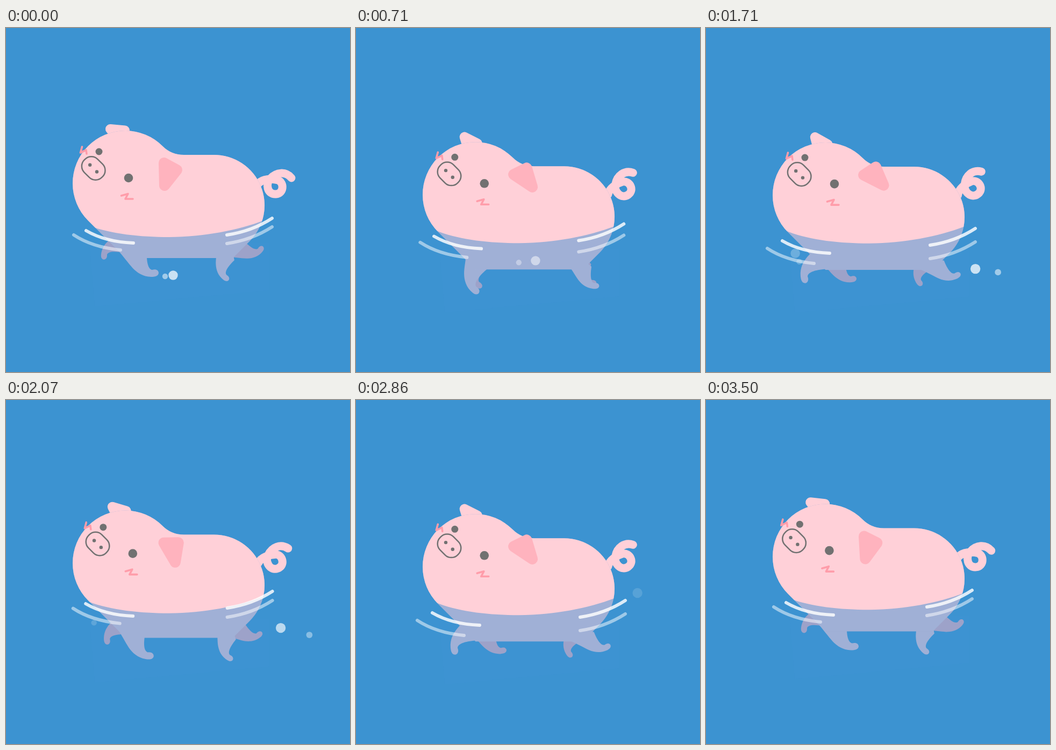
These frames come from a looping animation (640x640 px, 3570 ms). An HTML page with a canvas:

```html
<!DOCTYPE html>
<html lang="en">
<head>
<meta charset="utf-8">
<title>Swimming pig</title>
<style>
html, body { margin: 0; width: 100%; height: 100%; overflow: hidden; background: #3c93d1; }
canvas { display: block; }
</style>
</head>
<body>
<canvas id="stage" width="640" height="640"></canvas>
<script>
const ctx = document.getElementById('stage').getContext('2d');
const LOOP = 3570, FRAMES = 50, FRAME = 500 / 7, STROKES = 3;
const PINK = '#ffd0d8', ROSE = '#ffb3be', BLUSH = '#ff9daa', GREY = '#717171';
const WET = '#a0b0d6', WET_FAR = '#9da2c9';

// Head and rump are circles, joined by a flat back and 45 degree flanks
const body = new Path2D('M152.7 358.3A98 98 0 0 1 291.3 219.700A56 56 0 0 0 331 236H387A94 94 0 0 1 453.5 396.500L422 428H222.400Z');
const air = new Path2D('M0 0H640V300L481 357.500C430 377 370 388 303 389C250 389 195 383 155 368L100 345L0 300Z');
const leg = new Path2D('M26 15C25 38 29 50 36 51C43 49 48 52 48 57C47 63 41 64 34 64C18 63.500 8 56 0 48C-9 38 -18 25 -32 10L-10 -10Z');
const tail = new Path2D('M470 289C478 280 495 280 506 283C518 288 517 308 502 309C486 310 482 290 492 280C503 268 520 266 531 279');
const farEar = new Path2D('M194 188L221 190.500L206 203Z');
const nearEar = new Path2D('M294 251L318 264L295 293Z');
const cheeks = new Path2D('M214.500 312L227 308.500L222 318H236M141.500 221L138.500 232L149 227L150 234');
const glow = new Path2D('M155 400L165 518L490 488V400Z');

// Path, opacity, drift during a stroke
const ripples = [
  ['M149 377Q185 398 237 400', .82, -7, 19],
  ['M126 385Q161 408 213 413', .5, -12, 25],
  ['M411 385Q458 378 495 354', .82, 6, 19],
  ['M411 401Q458 394 495 370', .5, 6, 28]
].map(([d, ...rest]) => [new Path2D(d), ...rest]);

// Hip x, hip y, scale, angle at rest, turn during a kick, colour
const legs = [
  [236, 399, .85, 100, -104, WET_FAR],
  [420, 402, .79, -45, 104, WET_FAR],
  [236, 399, 1, 0, 84, WET],
  [418, 408, .83, 44, -68, WET]
];

// First frame, life in frames, x, y, drift, rise, radius, opacity
const bubbles = [
  [0, 18, 311, 460, 30, 55, 8.7, .72],
  [0, 18, 296, 462, 9, 52, 5.2, .52],
  [16, 12, 180, 453, -16, 55, 8.7, .45],
  [20, 16, 183, 447, -25, 65, 5.2, .25],
  [22, 20, 497, 455, 27, 109, 9.2, .74],
  [20, 17, 523, 465, 56, 60, 5.9, .55]
];

// Bezier ease from 0 to 1 with inner heights a and b
const ease = (u, a, b) => 3 * u * (1 - u) ** 2 * a + 3 * u * u * (1 - u) * b + u ** 3;
const easeOut = u => Math.sin(Math.PI / 2 * Math.min(1, u));

function at(x, y, draw, angle = 0, scale = 1) {
  ctx.save();
  ctx.translate(x, y);
  ctx.rotate(angle * Math.PI / 180);
  ctx.scale(scale, scale);
  draw();
  ctx.restore();
}

const turn = (x, y, angle, draw) =>
  at(x, y, () => { ctx.translate(-x, -y); draw(); }, angle);

function fill(path, color) {
  ctx.fillStyle = color;
  ctx.fill(path);
}

function stroke(path, color, width) {
  ctx.strokeStyle = color;
  ctx.lineWidth = width;
  ctx.stroke(path);
}

function blob(path, color, width) {
  fill(path, color);
  stroke(path, color, width);
}

function dot(x, y, r, color) {
  const p = new Path2D();
  p.arc(x, y, r, 0, Math.PI * 2);
  fill(p, color);
}

const white = alpha => `rgba(255,255,255,${alpha})`;

function drawFace() {
  dot(173, 230, 6.5, GREY);
  dot(228, 279, 8.3, GREY);
  dot(156.2, 254.800, 3.2, GREY);
  dot(169, 267.500, 3.2, GREY);
  at(162.7, 261, () => {
    const snout = new Path2D();
    snout.roundRect(-23, -17.5, 46, 35, 16.5);
    stroke(snout, GREY, 2.5);
  }, 45);
  stroke(cheeks, BLUSH, 3.6);
}

function draw(k) {
  const phase = k * STROKES / FRAMES % 1;
  const u = 1 - Math.abs(1 - 2 * phase);
  const dip = 22.3 * ease(u, .26, 1.07);
  const look = 10.4 * ease(u, .3, 1.3);
  const flap = 1.1 * ease(u, 0, .7);
  const kick = easeOut(2 * phase % 1 / .68);
  const swing = phase < .5 ? kick : 1 - kick;
  const level = dip * .53;

  ctx.fillStyle = '#3c93d1';
  ctx.fillRect(0, 0, 640, 640);
  ctx.lineCap = ctx.lineJoin = 'round';
  at(0, level, () => fill(glow, 'rgba(80,145,218,.07)'));

  at(0, dip, () => {
    for (const [x, y, size, rest, sweep, color] of legs)
      at(x, y, () => fill(leg, color), rest + sweep * swing, size);
    turn(469, 291, -37 * flap, () => stroke(tail, PINK, 15));
    turn(215, 205, 25 * flap, () => blob(farEar, PINK, 18));
    fill(body, WET);
  });

  ctx.save();
  ctx.translate(0, level);
  ctx.clip(air);
  ctx.translate(0, dip - level);
  fill(body, PINK);
  ctx.restore();

  at(0, dip, () => turn(294, 252, -64 * flap, () => blob(nearEar, ROSE, 20)));
  at(look, dip - look, drawFace);

  for (const [path, alpha, dx, dy] of ripples)
    at(dx * swing, dy * swing, () => stroke(path, white(alpha), 6));

  for (const [born, life, x, y, drift, rise, r, alpha] of bubbles) {
    const q = (k - born) / life;
    if (q >= 0 && q < 1)
      dot(x + drift * easeOut(q), y - rise * q ** 1.2, r, white(alpha * (1 - q * q)));
  }
}

function tick() {
  const t = performance.now() % LOOP;
  // Frame starts fall on whole hundredths of a second
  draw(Math.min(FRAMES - 1, Math.floor((Math.floor(t / 10) * 10 + 5) / FRAME)));
  requestAnimationFrame(tick);
}
tick();
</script>
</body>
</html>
```
